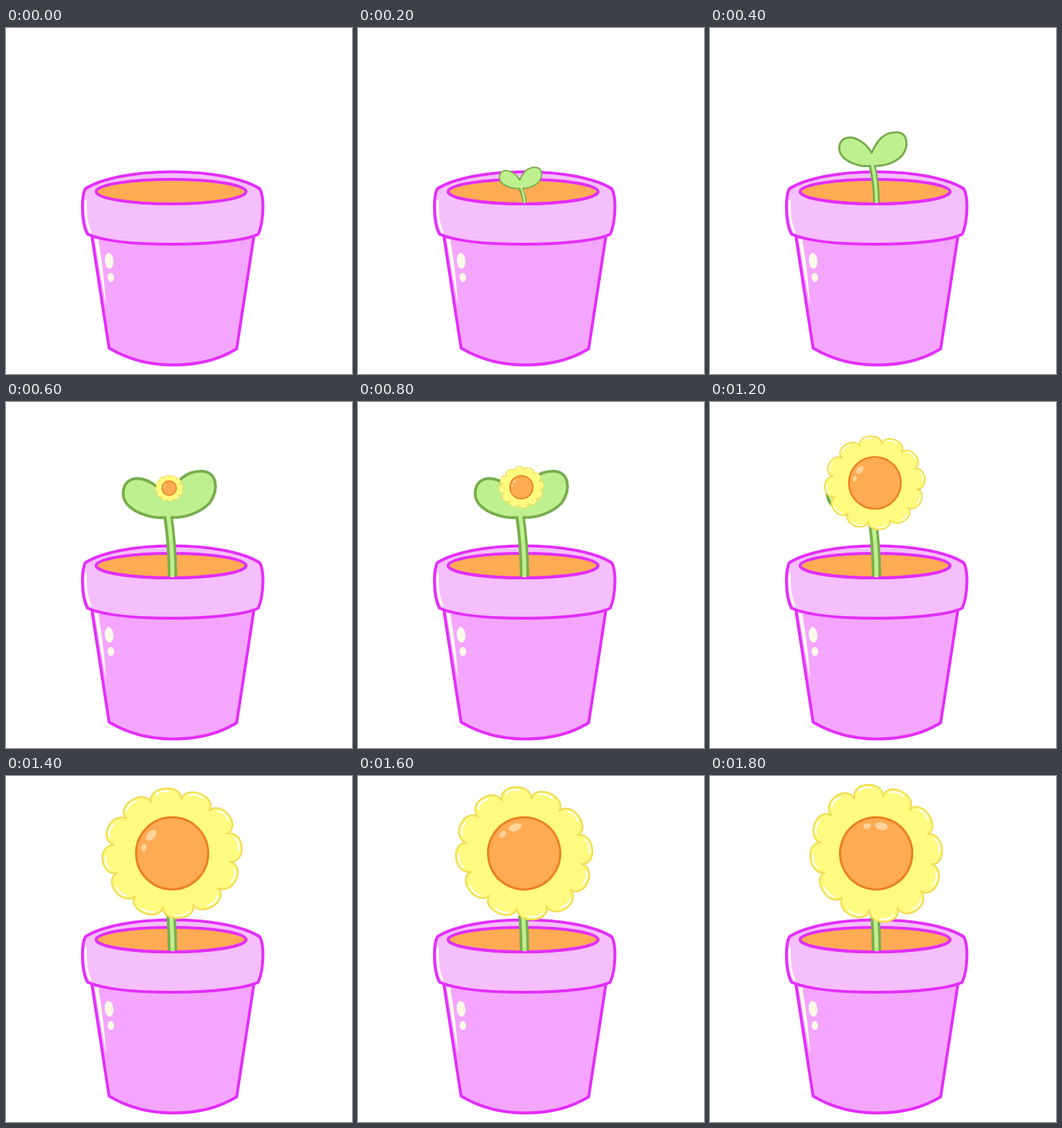
Write an HTML page with a canvas that moves like this. It is 480 by 480 pixels and loops after 1.9 s.

```html
<!DOCTYPE html>
<html lang="en">
<head>
<meta charset="utf-8">
<title>Growing flower</title>
<style>
  html, body { margin: 0; width: 100%; height: 100%; overflow: hidden; background: #fff; }
  canvas { display: block; width: 480px; height: 480px; }
</style>
</head>
<body>
<canvas width="480" height="480"></canvas>
<script>
const ctx = document.querySelector('canvas').getContext('2d');
const LOOP = 1900, STEP = 100, PETALS = 12;
const PURPLE = '#e32efb', ORANGE = '#ffab53', CREAM = '#fffbea', LEAF = '#bff08f', STEM = '#78ad4d';

const body = new Path2D('M119 288L143 444Q182 467.500 232 467.500Q284 467.500 320 445L344 288Z');
const rim = new Path2D('M110 223C132 209 177 199.500 231 199.500S330 209 352 223Q356.500 231 356.500 248Q356 273 350 286C334 294 288 300 231 300S134 295 113 286Q106 273 106 248Q106 231 110 223Z');
const bodyShine = new Path2D('M123 293L128 293Q136 340 139 386Q131 345 123 293Z');
const rimShine = new Path2D('M110.500 238Q110 272 118 284');
const leaves = new Path2D('M0 0C-22 3 -61 -8 -62 -33C-62 -62 -24 -62 0 -25C8 -45 22 -64 46 -64C69 -64 71 -38 58 -20C44 -5 20 2 0 0Z');
const petals = new Path2D();
const petalShine = new Path2D();

const polar = (deg, r) => [r * Math.sin(deg * Math.PI / 180), -r * Math.cos(deg * Math.PI / 180)];
petals.moveTo(...polar(-21, 79));
for (let i = 0; i < PETALS; i++) {
  const a = i * 360 / PETALS - 6;
  petals.bezierCurveTo(...polar(a - 13, 102), ...polar(a + 13, 102), ...polar(a + 15, 79));
  petalShine.moveTo(...polar(a - 9, 86));
  petalShine.quadraticCurveTo(...polar(a - 5, 93), ...polar(a + 4, 89));
}
petals.closePath();

// Linear interpolation through [time, value] keys, held at both ends
function track(t, ...keys) {
  if (t <= keys[0][0]) return keys[0][1];
  for (let i = 1; i < keys.length; i++) {
    const [t0, v0] = keys[i - 1], [t1, v1] = keys[i];
    if (t <= t1) return v0 + (v1 - v0) * (t - t0) / (t1 - t0);
  }
  return keys[keys.length - 1][1];
}

function paint(path, fill, stroke, width) {
  if (fill) { ctx.fillStyle = fill; ctx.fill(path); }
  if (stroke) { ctx.strokeStyle = stroke; ctx.lineWidth = width; ctx.stroke(path); }
}

function oval(x, y, rx, ry, turn = 0, from = 0, to = 2 * Math.PI) {
  const path = new Path2D();
  path.ellipse(x, y, rx, ry, turn, from, to);
  return path;
}

function drawPot() {
  paint(body, '#f4a6ff', PURPLE, 4);
  paint(bodyShine, CREAM);
  paint(oval(143, 323, 6, 11, -0.08), CREAM);
  paint(oval(145.5, 346, 4.5, 6.2, -0.1), CREAM);
  paint(rim, '#f4bffc', PURPLE, 4);
  paint(rimShine, null, CREAM, 3);
  paint(oval(229, 227, 104, 17), ORANGE, PURPLE, 4);
}

function drawSprout(t) {
  const tip = track(t, [100, 238], [600, 160]);
  const size = track(t, [100, 0.32], [600, 1]);
  const droop = track(t, [1400, 0], [1600, 16]);
  const stem = top => new Path2D(`M225 ${top}Q231 ${(top + 243) / 2} 231 243`);

  paint(stem(tip), null, STEM, 13 * size);
  paint(oval(229, 227, 104, 17, 0, 0, Math.PI), null, PURPLE, 4);
  ctx.save();
  ctx.translate(224.5, tip + droop);
  ctx.scale(size, size);
  paint(leaves, LEAF, STEM, 4);
  ctx.restore();
  paint(stem(tip - 3), null, LEAF, 5.5 * size);
}

function drawFlower(t) {
  const size = track(t, [400, 0], [600, 0.2], [1000, 0.44], [1400, 1]);
  const x = track(t, [400, 226], [1000, 227], [1400, 230.5]);
  const y = track(t, [400, 160], [600, 119.5], [1000, 117], [1400, 107.3]);
  const line = (1 + 2 * size) / size;

  ctx.save();
  ctx.translate(x, y);
  ctx.scale(size, size);
  ctx.rotate(track(t, [1400, 0], [1800, Math.PI / 3]));
  ctx.save();
  ctx.scale(1.035, 0.965);
  paint(petals, '#fffa80', '#f1dd55', line * 0.8);
  paint(petalShine, null, '#fffff0', 2.5);
  ctx.restore();
  paint(oval(0, 0, 50, 50), ORANGE, '#ea8022', line);
  paint(oval(-29, -25, 9, 5.3, -0.85), '#ffd49b');
  paint(oval(-39, -8, 5.5, 3.6, -1.3), '#ffd49b');
  ctx.restore();
}

function frame(now) {
  const t = Math.floor(now % LOOP / STEP) * STEP;
  ctx.clearRect(0, 0, 480, 480);
  drawPot();
  if (t >= 100) drawSprout(t);
  if (t > 400) drawFlower(t);
  requestAnimationFrame(frame);
}

ctx.lineJoin = 'round';
const start = performance.now();
requestAnimationFrame(() => frame(0));
frame = (draw => () => draw(Math.max(0, performance.now() - start)))(frame);
</script>
</body>
</html>
```
